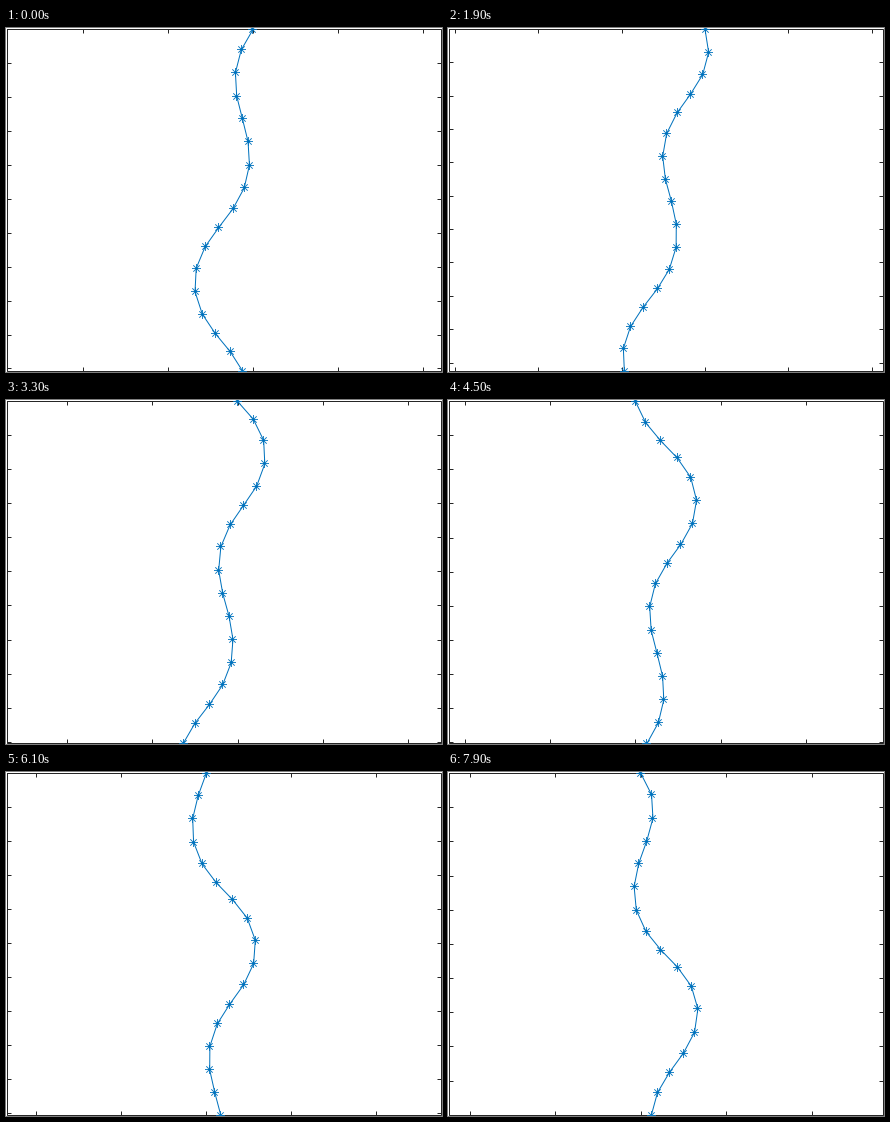
Animation of 436x344 px, one loop 8000 ms. Source, as a matplotlib script:

```python
import numpy as np
import matplotlib.pyplot as plt
from matplotlib.animation import FuncAnimation

W, H, DPI = 436, 344, 100
PX = 72 / DPI                       # one pixel in points
LEFT, RIGHT, TOP, BOTTOM = 0, 434, 0, 342
NUDGE_X, NUDGE_Y = 0.5, 1           # the chain sits slightly off the box grid
LINKS = np.arange(1, 17)
LINK = 0.692                        # link length in vertical tick steps
BLUE, GREY = (0, 0.447, 0.741), (0.15, 0.15, 0.15)

# The bending wave: place of each crest along the chain (in links)
# and the heading there (radians from straight down).
CREST_AT = np.array([-14.6, -10.3, -5.1, 0, 4.45, 9.35, 15, 20])
CREST = np.array([0.8, -0.35, 0.77, -0.63, 0.27, -0.66, 0.69, -0.6])

# How far the wave has run towards the tail at some steps.
STEP_AT = [0, 8, 15, 21, 25, 33, 38]
TRAVEL = [0, 3.75, 5.5, 7.97, 9.66, 12.78, 14.05]


def wave(u):
    """Heading at wave position u, eased from crest to crest."""
    j = np.clip(np.searchsorted(CREST_AT, u, "right") - 1, 0, len(CREST) - 2)
    t = np.clip((u - CREST_AT[j]) / (CREST_AT[j + 1] - CREST_AT[j]), 0, 1)
    ease = (1 - np.cos(np.pi * t)) / 2
    return CREST[j] + ease * (CREST[j + 1] - CREST[j])


def chain(step):
    """Joint positions in pixels and the size of one vertical tick step."""
    heading = wave(LINKS - np.interp(step, STEP_AT, TRAVEL))
    x = np.append(0, np.cumsum(np.sin(heading)))
    y = np.append(0, np.cumsum(np.cos(heading)))
    scale = (BOTTOM - TOP) / y[-1]
    x = (LEFT + RIGHT) / 2 + scale * (x - (x.min() + x.max()) / 2)
    return x, TOP + scale * y, scale / LINK


def strokes(segments):
    """Join separate segments into one broken line."""
    pts = []
    for x0, y0, x1, y1 in segments:
        pts += [(x0, y0), (x1, y1), (np.nan, np.nan)]
    return np.array(pts).T


def tick_segments(head_x, unit, size=4):
    segs = []
    for y in np.round(np.arange(TOP + unit, BOTTOM + 0.5, unit)):
        segs += [(LEFT, y, LEFT + size, y), (RIGHT - size, y, RIGHT, y)]
    gap = 2.5 * unit
    first = head_x - gap * ((head_x - LEFT) // gap)
    for x in np.round(np.arange(first, RIGHT, gap)):
        segs += [(x, TOP, x, TOP + size), (x, BOTTOM - size, x, BOTTOM)]
    return segs


def star_segments(xs, ys, r=4.5, d=3.2):
    return [(x - dx, y - dy, x + dx, y + dy)
            for x, y in zip(np.round(xs), np.round(ys))
            for dx, dy in ((r, 0), (0, r), (d, d), (d, -d))]


fig = plt.figure(figsize=(W / DPI, H / DPI), dpi=DPI, facecolor="white")
ax = fig.add_axes([0, 0, 1, 1])
ax.set_xlim(-0.5, W - 0.5)
ax.set_ylim(H - 0.5, -0.5)
ax.axis("off")

ax.plot([LEFT, RIGHT, RIGHT, LEFT, LEFT], [TOP, TOP, BOTTOM, BOTTOM, TOP],
        color=GREY, lw=PX, solid_joinstyle="miter")
ticks, = ax.plot([], [], color=GREY, lw=PX, solid_capstyle="butt")
body, = ax.plot([], [], color=BLUE, lw=PX)
stars, = ax.plot([], [], color=BLUE, lw=0.85 * PX, solid_capstyle="butt",
                 snap=False)


def draw(frame):
    # the first pose holds for 500 ms, then one step every 200 ms
    step = 0 if frame < 5 else (frame - 5) // 2 + 1
    x, y, unit = chain(step)
    ticks.set_data(*strokes(tick_segments(x[0], unit)))
    x, y = x + NUDGE_X, y + NUDGE_Y
    body.set_data(x, y)
    stars.set_data(*strokes(star_segments(x, y)))
    return ticks, body, stars


anim = FuncAnimation(fig, draw, frames=80, interval=100, repeat=True,
                     repeat_delay=0, blit=False)
plt.show()
```
